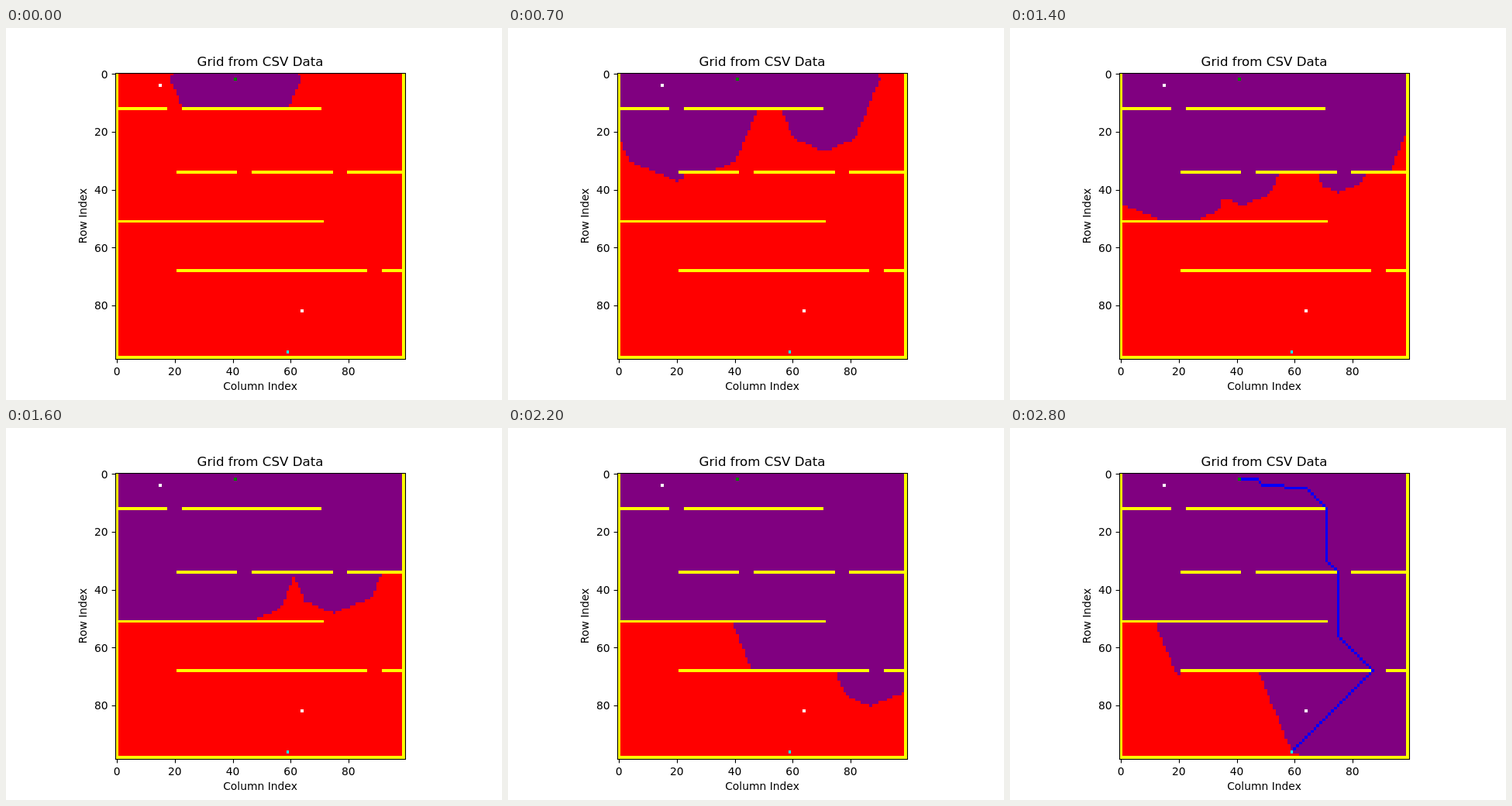
Recreate the animation shown at these times as an HTML page with a canvas. Size 640x480 px, loop 3950 ms.

```html
<!DOCTYPE html>
<html lang="en">
<head>
<meta charset="utf-8">
<title>Grid from CSV Data</title>
<style>
html, body { margin: 0; width: 100%; height: 100%; overflow: hidden; background: #fff; }
canvas { display: block; width: 640px; height: 480px; }
</style>
</head>
<body>
<canvas id="stage" width="640" height="480"></canvas>
<script>
const ctx = document.getElementById('stage').getContext('2d');
const COLS = 100, ROWS = 99;
const LOOP = 3950, STEP = 100, LAST = 28;
const FIRST_COUNT = 500, COUNT_STEP = 250;
const START = [41, 2], GOAL = [59, 96], MARKS = [[15, 4], [64, 82]];

// Walls as [row, first column, last column]
const WALLS = [
  [12, 0, 17], [12, 23, 70],
  [34, 21, 41], [34, 47, 74], [34, 80, 99],
  [51, 0, 71],
  [68, 21, 86], [68, 92, 99],
  [98, 0, 99]
];
const ROUTE = [
  [42, 2], [47, 2], [49, 4], [56, 4], [57, 5], [64, 5], [71, 12],
  [71, 30], [75, 34], [75, 56], [87, 68], [60, 95]
];

const id = (c, r) => r * COLS + c;
const edgeX = c => Math.round(141 + c * 3.74);
const edgeY = r => Math.round(57 + r * 370 / ROWS);

const wall = new Uint8Array(COLS * ROWS);
for (const [r, a, b] of WALLS) wall.fill(1, id(a, r), id(b, r) + 1);
for (let r = 0; r < ROWS; r++) wall[id(0, r)] = wall[id(COLS - 1, r)] = 1;

// Shortest-path search over eight neighbours; returns each cell's visiting order.
function search() {
  const dist = new Float64Array(COLS * ROWS).fill(Infinity);
  const rank = new Float64Array(COLS * ROWS).fill(Infinity);
  const goal = id(...GOAL);
  const open = [id(...START)];
  const before = (a, b) => {
    const d = dist[a] - dist[b];
    return Math.abs(d) > 1e-9 ? d < 0 : a < b;
  };
  dist[open[0]] = 0;
  for (let n = 0; open.length; n++) {
    let best = 0;
    for (let i = 1; i < open.length; i++) if (before(open[i], open[best])) best = i;
    const cell = open[best];
    open[best] = open[open.length - 1];
    open.pop();
    rank[cell] = n;
    if (cell === goal) break;
    const c = cell % COLS, r = (cell - c) / COLS;
    for (let dr = -1; dr <= 1; dr++) {
      for (let dc = -1; dc <= 1; dc++) {
        if (r + dr < 0 || r + dr >= ROWS) continue;
        const next = id(c + dc, r + dr);
        if (wall[next] || rank[next] < Infinity) continue;
        const d = dist[cell] + Math.hypot(dc, dr);
        if (dist[next] === Infinity) open.push(next);
        if (d < dist[next]) dist[next] = d;
      }
    }
  }
  return rank;
}
const rank = search();

function fillCell(c, r, color) {
  const x = edgeX(c), y = edgeY(r);
  ctx.fillStyle = color;
  ctx.fillRect(x, y, edgeX(c + 1) - x, edgeY(r + 1) - y);
}

function drawRoute() {
  for (let i = 1; i < ROUTE.length; i++) {
    const [c0, r0] = ROUTE[i - 1], [c1, r1] = ROUTE[i];
    const n = Math.max(Math.abs(c1 - c0), Math.abs(r1 - r0));
    for (let k = 0; k <= n; k++) {
      fillCell(c0 + (c1 - c0) * k / n, r0 + (r1 - r0) * k / n, '#0000ff');
    }
  }
}

function drawGrid(step) {
  const count = step === LAST ? Infinity : FIRST_COUNT + COUNT_STEP * step;
  ctx.save();
  ctx.beginPath();
  ctx.rect(141, 58, 374, 369);
  ctx.clip();
  ctx.fillStyle = '#ff0000';
  ctx.fillRect(141, 57, 374, 370);
  for (let r = 0; r < ROWS; r++) {
    for (let c = 0; c < COLS; c++) {
      const i = id(c, r);
      if (wall[i]) fillCell(c, r, '#ffff00');
      else if (rank[i] < count) fillCell(c, r, '#800080');
    }
  }
  if (step === LAST) drawRoute();
  for (const [c, r] of MARKS) fillCell(c, r, '#ffffff');
  fillCell(...START, '#008000');
  fillCell(...GOAL, '#00ffff');
  ctx.restore();
}

function label(text, x, y, size, align) {
  ctx.font = size + 'px "DejaVu Sans", sans-serif';
  ctx.textAlign = align;
  ctx.fillText(text, x, y);
}

function line(x0, y0, x1, y1) {
  ctx.beginPath();
  ctx.moveTo(x0, y0);
  ctx.lineTo(x1, y1);
  ctx.stroke();
}

function drawAxes() {
  const small = 13.889;
  ctx.fillStyle = ctx.strokeStyle = '#000';
  ctx.lineWidth = 1.11;
  ctx.strokeRect(141.5, 58.5, 374, 369);
  for (let v = 0; v <= 80; v += 20) {
    const cx = 143.2 + v * 3.7333, cy = 59.47 + v * 3.7333;
    const tx = Math.round(cx) + 0.5, ty = Math.round(cy) + 0.5;
    line(tx, 427.5, tx, 432.4);
    line(141.5, ty, 136.6, ty);
    label(v, cx, 448, small, 'center');
    label(v, 131.6, Math.round(cy + 5.06), small, 'right');
  }
  label('Grid from CSV Data', 328, 49, 16.667, 'center');
  label('Column Index', 328, 467, small, 'center');
  ctx.save();
  ctx.translate(104, 242.4);
  ctx.rotate(-Math.PI / 2);
  label('Row Index', 0, 0, small, 'center');
  ctx.restore();
}

function draw(step) {
  ctx.fillStyle = '#fff';
  ctx.fillRect(0, 0, 640, 480);
  drawGrid(step);
  drawAxes();
}

const begin = performance.now();
let shown = -1;
function tick() {
  const t = (performance.now() - begin) % LOOP;
  const step = Math.min(LAST, Math.floor(t / STEP));
  if (step !== shown) draw(shown = step);
  requestAnimationFrame(tick);
}
tick();
</script>
</body>
</html>
```
